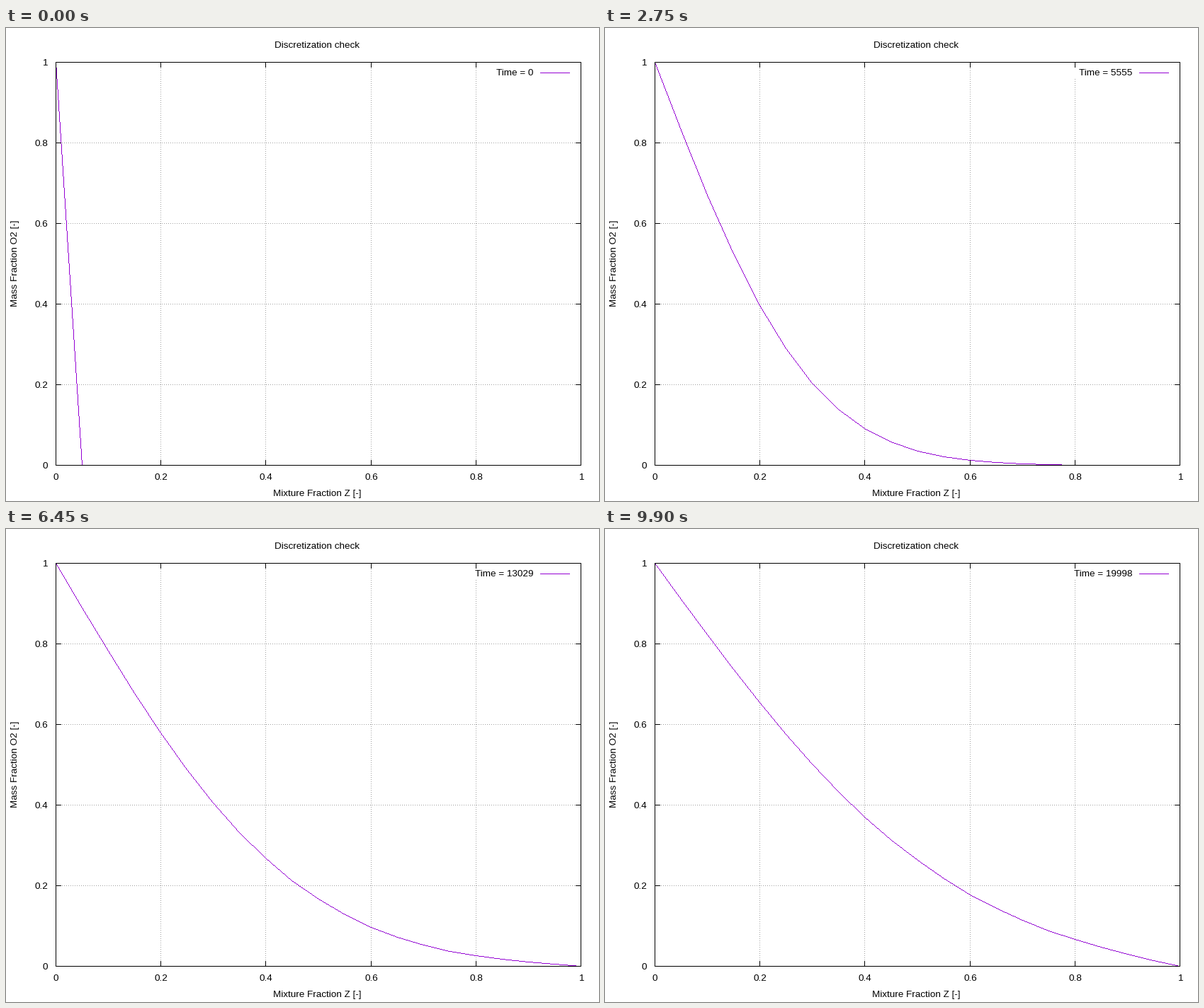
Recreate the animation shown at these times as a matplotlib script. Size 837 by 669 pixels, loop 9950 ms.

```python
import numpy as np
import matplotlib.pyplot as plt
from matplotlib.animation import FuncAnimation

W, H, DPI = 837, 669, 96
LEFT, RIGHT, TOP, BOTTOM = 70, 811, 48, 618
FRAMES, INTERVAL = 199, 50
STEPS = 101            # solver steps of one second per frame
CELLS = 20
DIFFUSIVITY = 5e-6

BLACK, GREY, PURPLE = (0, 0, 0), (160, 160, 160), (148, 0, 211)
TICKS = np.linspace(0, 1, 6)
KEY_TOP, KEY_BOTTOM, KEY_ROW = 56, 71, 63
TICK = 8

plt.rcParams["font.family"] = "Liberation Sans"
plt.rcParams["font.size"] = 10.1


def to_col(z):
    return np.floor(LEFT + (RIGHT - LEFT) * np.asarray(z) + 0.5).astype(int)


def to_row(u):
    return BOTTOM - np.floor((BOTTOM - TOP) * np.asarray(u) + 0.5).astype(int)


def solve():
    """Explicit diffusion in mixture fraction, one profile per frame."""
    r = DIFFUSIVITY * CELLS ** 2
    step = np.eye(CELLS + 1)
    for i in range(1, CELLS):
        step[i, i - 1:i + 2] = r, 1 - 2 * r, r
    jump = np.linalg.matrix_power(step, STEPS)
    u = np.zeros(CELLS + 1)
    u[0] = 1
    profiles = [u]
    for _ in range(FRAMES - 1):
        profiles.append(jump @ profiles[-1])
    return profiles


def draw_grid(img, wide_key):
    for t in TICKS[1:-1]:
        img[to_row(t), LEFT:RIGHT + 1:3] = GREY
        img[BOTTOM:TOP:-3, to_col(t)] = GREY
    if wide_key:
        img[KEY_TOP:KEY_BOTTOM, to_col(0.8)] = 255


def draw_curve(img, u):
    cols, rows = to_col(np.linspace(0, 1, CELLS + 1)), to_row(u)
    for x0, y0, x1, y1 in zip(cols, rows, cols[1:], rows[1:]):
        n = max(abs(x1 - x0), abs(y1 - y0)) + 1
        x = np.floor(np.linspace(x0, x1, n) + 0.5).astype(int)
        y = np.floor(np.linspace(y0, y1, n) + 0.5).astype(int)
        img[y, x] = PURPLE


def draw_border(img):
    img[[TOP, BOTTOM], LEFT:RIGHT + 1] = BLACK
    img[TOP:BOTTOM + 1, [LEFT, RIGHT]] = BLACK
    for t in TICKS[1:-1]:
        x, y = to_col(t), to_row(t)
        img[y, LEFT:LEFT + TICK] = BLACK
        img[y, RIGHT - TICK + 1:RIGHT + 1] = BLACK
        img[TOP:TOP + TICK, x] = BLACK
        img[BOTTOM - TICK + 1:BOTTOM + 1, x] = BLACK


def label(x, y, text, ha="center", **kw):
    return fig.text(x / W, 1 - y / H, text, ha=ha, va="baseline",
                    color="black", **kw)


fig = plt.figure(figsize=(W / DPI, H / DPI), dpi=DPI, facecolor="white")
picture = fig.figimage(np.full((H, W, 3), 255, np.uint8), origin="upper")

label(439, 28, "Discretization check")
label(439, 662, "Mixture Fraction Z [-]")
label(16, 333, "Mass Fraction O2 [-]", rotation=90, rotation_mode="anchor")
for t in TICKS:
    label(to_col(t) + 0.5, 639, f"{t:g}")
    label(59, to_row(t) + 5, f"{t:g}", ha="right")
key = label(744, 67, "", ha="right")

profiles = solve()


def update(i):
    time = i * STEPS
    img = np.full((H, W, 3), 255, np.uint8)
    draw_grid(img, time >= 1000)
    draw_curve(img, profiles[i])
    img[KEY_ROW, 754:796] = PURPLE
    draw_border(img)
    picture.set_data(img)
    key.set_text(f"Time = {time}")
    return picture, key


anim = FuncAnimation(fig, update, frames=FRAMES, interval=INTERVAL,
                     repeat=True, repeat_delay=0, blit=False)
plt.show()
```
